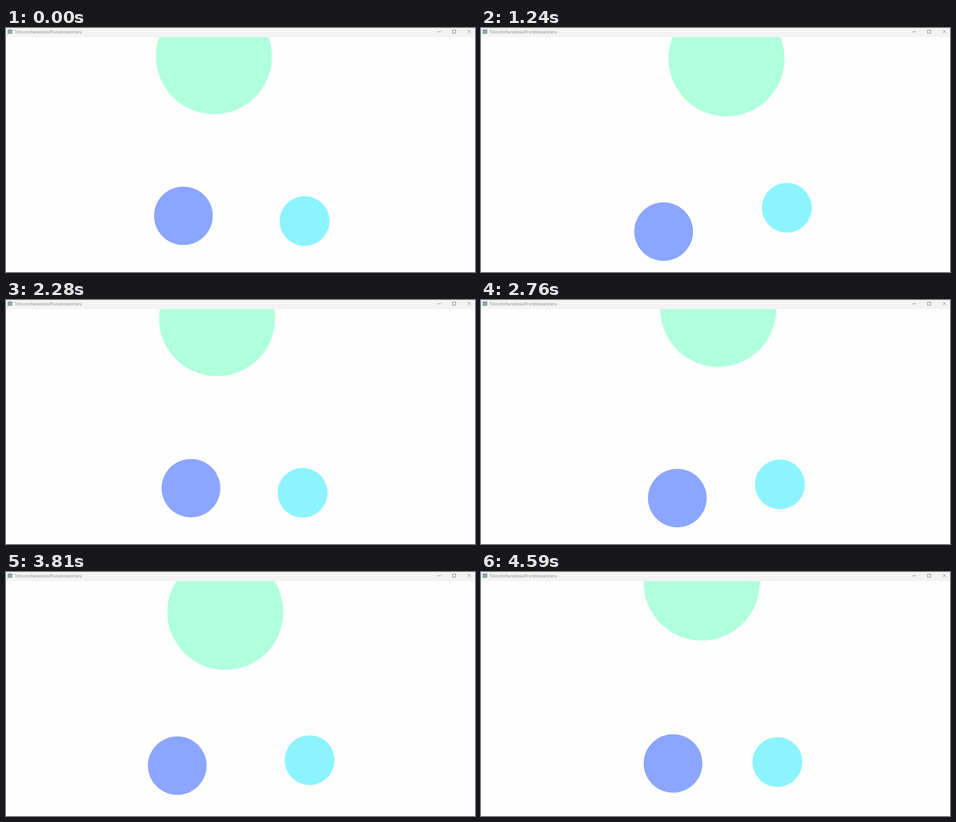
An HTML page for the animation above (4.66 s loop, 1035 px wide and 541 px high).

```html
<!DOCTYPE html>
<html lang="en">
<head>
<meta charset="utf-8">
<title>Drifting circles</title>
<style>
  html, body { margin: 0; width: 100%; height: 100%; overflow: hidden; background: #fefefe; }
  svg { display: block; width: 100%; height: 100%; }
  text { font: 8.6px "Open Sans", "Noto Sans", sans-serif; fill: #838383; }
</style>
</head>
<body>
<svg viewBox="0 0 1035 541">
  <rect width="1035" height="541" fill="#fefefe"/>
  <g id="scene"></g>
  <rect width="1035" height="20" fill="#f3f3f3"/>
  <rect x="3.5" y="3" width="10.5" height="10" fill="#8fa5a8"/>
  <text x="19" y="11.8">ToloumirbanedolavPrunelosvatimera</text>
  <g fill="none" stroke="#777" stroke-width="1">
    <path d="M952 8.5h8"/>
    <rect x="985.5" y="4.5" width="7" height="7"/>
    <path d="M1019 4.5l7 7m0-7l-7 7"/>
  </g>
</svg>
<script>
const LOOP = 4660;
const STEP = 69.4;
const LAST = 66;
const TURN = 30; // steps per orbit

// Tilted elliptical orbits: centre + c * cos(a) + s * sin(a)
const discs = [
  { r: 128, fill: "#b0ffdd", x: 503.75, y: 54.5, c: [-44.75, 9], s: [-3.6, -34.64] },
  { r: 64.8, fill: "#8ca5ff", x: 405.6, y: 434.25, c: [-14.4, -17.75], s: [23.56, -4.76] },
  { r: 55, fill: "#8cf4ff", x: 664.75, y: 413, c: [-5.75, 15], s: [-9.38, 4.04] }
];

const scene = document.getElementById("scene");
for (const d of discs) {
  d.el = document.createElementNS("http://www.w3.org/2000/svg", "circle");
  d.el.setAttribute("r", d.r);
  d.el.setAttribute("fill", d.fill);
  scene.appendChild(d.el);
}

function draw(time) {
  const step = Math.min(LAST, Math.floor((time % LOOP + 18) / STEP));
  const a = (step + 0.06) / TURN * 2 * Math.PI;
  const cos = Math.cos(a), sin = Math.sin(a);
  for (const d of discs) {
    d.el.setAttribute("cx", d.x + d.c[0] * cos + d.s[0] * sin);
    d.el.setAttribute("cy", d.y + d.c[1] * cos + d.s[1] * sin);
  }
}

function tick() {
  draw(performance.now());
  requestAnimationFrame(tick);
}
tick();
</script>
</body>
</html>
```
